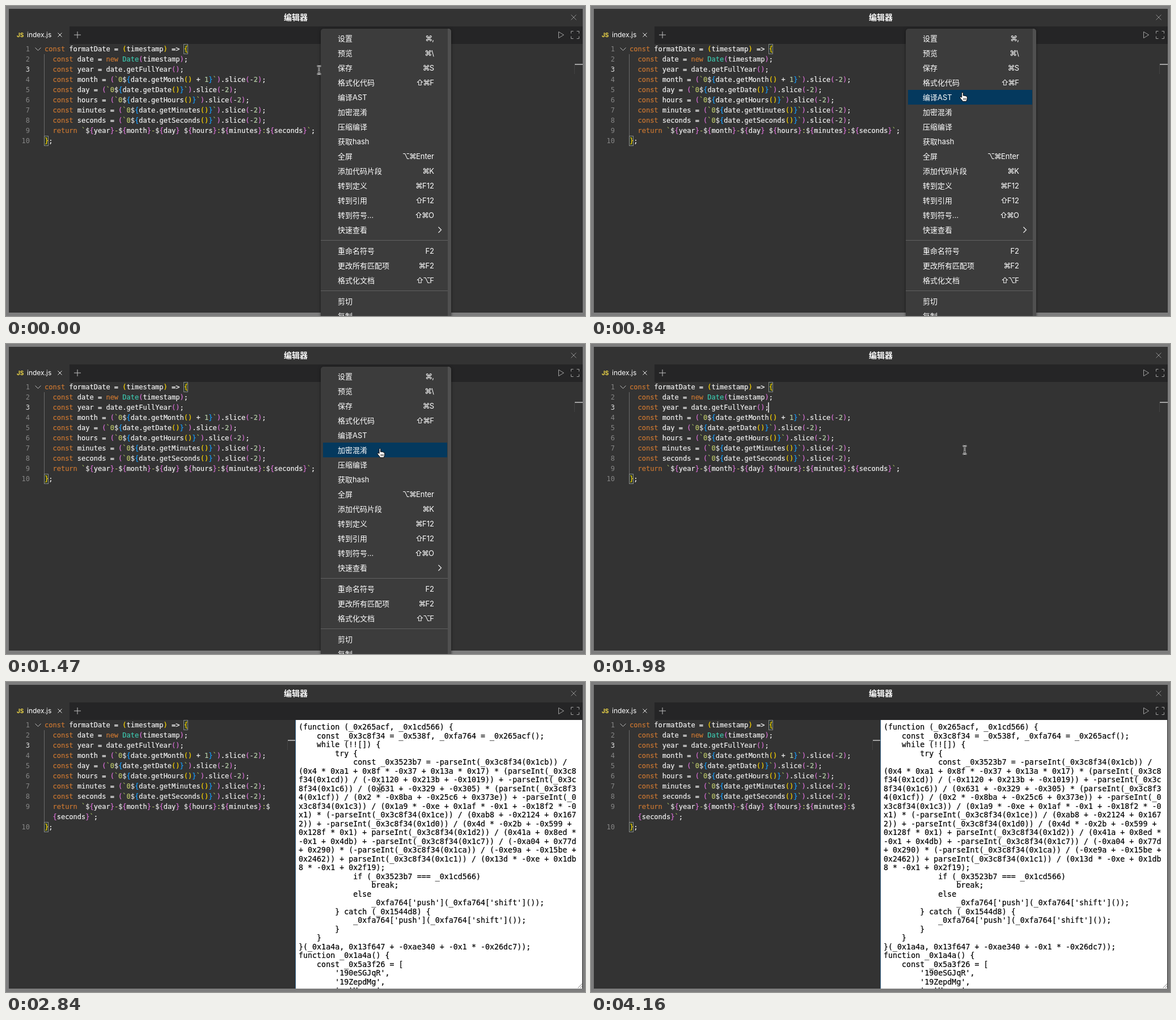
An HTML page for the animation above (4.21 s loop, 1021 by 547 pixels).

```html
<!DOCTYPE html>
<html lang="zh-CN">
<head>
<meta charset="utf-8">
<title>编辑器</title>
<style>
html, body { margin: 0; width: 100%; height: 100%; overflow: hidden; background: #7d7d7d; }
body { position: relative; font: 13px Inter, "Noto Sans CJK SC", "Noto Sans CJK", "DejaVu Sans", sans-serif; color: #fff; }
div, svg { position: absolute; }
.hidden { display: none; }
#win { left: 5px; top: 5px; width: 1012px; height: 536px; background: #333; }
#title { left: 5px; top: 5px; width: 1012px; line-height: 30px; text-align: center; font-size: 14px; font-weight: 600; }
#tabs { left: 112px; top: 36px; width: 905px; height: 31px; background: #252526; }
#badge { left: 19px; top: 43px; line-height: 17px; font-size: 10px; font-weight: 700; color: #f0d848; }
#file { left: 37px; top: 42px; line-height: 18px; font-size: 12px; }
.code, .num { font: 12px/18px "DejaVu Sans Mono", monospace; white-space: pre; }
.code { left: 68px; color: #f4f4f4; -webkit-text-stroke: .2px; }
.num { left: 12px; width: 30px; text-align: right; color: #858585; }
.num.on { color: #e0e0e0; }
.match { box-sizing: border-box; width: 8px; height: 18px; border: 1px solid #8a8a8a; background: rgba(0, 100, 0, .12); }
#guide { left: 67px; top: 85px; width: 1px; background: #6a6a6a; }
#mark { top: 102px; width: 14px; height: 2px; background: #a3a3a3; }
#rule { top: 104px; width: 1px; height: 16px; background: #434343; }
#caret { left: 312px; top: 103px; width: 2px; height: 18px; background: #c4c4c4; }
#panel { left: 510px; top: 67px; width: 505px; height: 474px; border-left: 1px solid #2b5a80; background: #fff; overflow: hidden; }
#out { left: 5px; top: 5px; font: 13.333px/15.5px "DejaVu Sans Mono", monospace; white-space: pre; color: #000; -webkit-text-stroke: .2px; }
#menu { left: 555px; top: 40px; width: 230px; height: 520px; background: #3c3c3c; border-radius: 5px; box-shadow: 0 1px 5px rgba(0, 0, 0, .5); overflow: hidden; }
#thumb { right: 0; top: 0; width: 6px; height: 100%; background: #505050; }
.item { left: 4px; width: 219px; height: 26px; line-height: 26px; }
.item.on { background: #04395e; }
.item b { position: absolute; left: 26px; font-weight: 400; white-space: nowrap; }
.item kbd { position: absolute; right: 23px; font: inherit; white-space: nowrap; }
.item kbd i { display: inline-block; width: 12px; text-align: center; font-style: normal; }
.sep { left: 0; width: 224px; height: 1px; background: #606060; }
svg { left: 0; top: 0; overflow: visible; fill: none; }
</style>
</head>
<body>
<div id="win"></div>
<div id="title">编辑器</div>
<div id="tabs"></div>
<div id="badge">JS</div>
<div id="file">index.js</div>
<svg width="1021" height="547" stroke="#c0c0c0">
  <path d="M91.5 47.5l7 7m0-7l-7 7" stroke="#eee"/>
  <path d="M120 51h12m-6-6v12"/>
  <path d="M996.5 15.5l9 9m0-9l-9 9" stroke="#909090"/>
  <path d="M974.5 45.5v11l9-5.5z" stroke="#a0a0a0"/>
  <path d="M996.5 48.5v-4h4m6 0h4v4m0 5v4h-4m-6 0h-4v-4" stroke="#a0a0a0"/>
  <path d="M51.5 73.5l5 5 5-5"/>
</svg>
<div id="guide"></div>
<div id="editor"></div>
<div id="rule"></div>
<div id="mark"></div>
<div id="caret"></div>
<div id="panel">
  <div id="out"></div>
  <svg width="505" height="474" stroke="#777"><path d="M497.5 473l8-8m-4 8l4-4"/></svg>
</div>
<div id="menu"><div id="thumb"></div></div>
<svg width="1021" height="547">
  <g id="hand">
    <path d="M-1.6 9V1.3Q-1.6 0-.3 0Q1 0 1 1.3V6Q2.5 5 3.6 6.3Q5 5.5 6 7Q8 6.4 8 8.4V11Q8 13.5 6.4 16H0Q-1 13.5-4 10.6Q-5.4 8.6-4 8Q-3 7.6-1.6 9Z" fill="#fff" stroke="#000"/>
    <path d="M1.6 10v3.5m2-3.5v3.5m2-3.5v3.5" stroke="#000" stroke-width=".8"/>
  </g>
  <g id="beam"></g>
</svg>
<script>
const $ = id => document.getElementById(id);
const LOOP = 4210, STEP = 30, ROW = 18, TOP = 67;

function add(parent, cls, style, html = '') {
  const el = document.createElement('div');
  el.className = cls;
  Object.assign(el.style, style);
  el.innerHTML = html;
  parent.append(el);
  return el;
}

// ---- code editor ----
const clock = (name, getter, extra = '') =>
  '  const ' + name + ' = (`0${date.' + getter + '()' + extra + '}`).slice(-2);';
const head = [
  'const formatDate = (timestamp) => {',
  '  const date = new Date(timestamp);',
  '  const year = date.getFullYear();',
  clock('month', 'getMonth', ' + 1'),
  clock('day', 'getDate'),
  clock('hours', 'getHours'),
  clock('minutes', 'getMinutes'),
  clock('seconds', 'getSeconds')
];
const ret = '  return `${year}-${month}-${day} ${hours}:${minutes}:$';
const wide = [...head, ret + '{seconds}`;', '};'];
const wrapped = [...head, ret, '  {seconds}`;', '};'];

function painter() {
  const pairs = ['#ffd700', '#da70d6', '#179fff'];
  const words = { const: '#cc7832', new: '#cc7832', return: '#cc7832', Date: '#3dc9b0' };
  let depth = 0, quoted = false, hole = false;
  const colour = tok => {
    if ('({'.includes(tok)) {
      if (quoted && tok === '{') hole = true;
      return pairs[depth++ % 3];
    }
    if (')}'.includes(tok)) {
      if (tok === '}') hole = false;
      return pairs[--depth % 3];
    }
    if (tok === '`') { quoted = !quoted; return '#a5c261'; }
    if (tok === '$') return '#e0e0e0';
    if (quoted && !hole) return '#b9c46a';
    if (/^\d/.test(tok)) return '#b5cea8';
    return words[tok] || '#f4f4f4';
  };
  return line => line.replace(/\w+|\s+|./g, tok =>
    `<span style="color:${colour(tok)}">${tok === '>' ? '&gt;' : tok}</span>`);
}

function buildCode(lines) {
  const box = add($('editor'), '', {});
  const paint = painter();
  const last = lines.length - 1;
  const px = row => TOP + row * ROW + 'px';
  add(box, 'match', { left: '313px', top: px(0) });
  add(box, 'match', { left: '67px', top: px(last) });
  let n = 0;
  lines.forEach((line, row) => {
    add(box, 'code', { top: px(row) }, paint(line));
    if (!line.startsWith('  {')) {
      n++;
      add(box, n === 3 ? 'num on' : 'num', { top: px(row) }, n);
    }
  });
  return box;
}
const wideBox = buildCode(wide), wrapBox = buildCode(wrapped);

$('out').textContent = `(function (_0x265acf, _0x1cd566) {
    const _0x3c8f34 = _0x538f, _0xfa764 = _0x265acf();
    while (!![]) {
        try {
            const _0x3523b7 = -parseInt(_0x3c8f34(0x1cb)) /
(0x4 * 0xa1 + 0x8f * -0x37 + 0x13a * 0x17) * (parseInt(_0x3c8
f34(0x1cd)) / (-0x1120 + 0x213b + -0x1019)) + -parseInt(_0x3c
8f34(0x1c6)) / (0x631 + -0x329 + -0x305) * (parseInt(_0x3c8f3
4(0x1cf)) / (0x2 * -0x8ba + -0x25c6 + 0x373e)) + -parseInt(_0
x3c8f34(0x1c3)) / (0x1a9 * -0xe + 0x1af * -0x1 + -0x18f2 * -0
x1) * (-parseInt(_0x3c8f34(0x1ce)) / (0xab8 + -0x2124 + 0x167
2)) + -parseInt(_0x3c8f34(0x1d0)) / (0x4d * -0x2b + -0x599 +
0x128f * 0x1) + parseInt(_0x3c8f34(0x1d2)) / (0x41a + 0x8ed *
-0x1 + 0x4db) + -parseInt(_0x3c8f34(0x1c7)) / (-0xa04 + 0x77d
+ 0x290) * (-parseInt(_0x3c8f34(0x1ca)) / (-0xe9a + -0x15be +
0x2462)) + parseInt(_0x3c8f34(0x1c1)) / (0x13d * -0xe + 0x1db
8 * -0x1 + 0x2f19);
            if (_0x3523b7 === _0x1cd566)
                break;
            else
                _0xfa764['push'](_0xfa764['shift']());
        } catch (_0x1544d8) {
            _0xfa764['push'](_0xfa764['shift']());
        }
    }
}(_0x1a4a, 0x13f647 + -0xae340 + -0x1 * -0x26dc7));
function _0x1a4a() {
    const _0x5a3f26 = [
        '190eSGJqR',
        '19ZepdMg',
        'getHours',`;

// ---- context menu ----
const entries = [
  '设置|⌘,', '预览|⌘\\', '保存|⌘S', '格式化代码|⇧⌘F', '编译AST|', '加密混淆|', '压缩编译|',
  '获取hash|', '全屏|⌥⌘Enter', '添加代码片段|⌘K', '转到定义|⌘F12', '转到引用|⇧F12',
  '转到符号...|⇧⌘O', '快速查看|', '', '重命名符号|F2', '更改所有匹配项|⌘F2', '格式化文档|⇧⌥F',
  '', '剪切|', '复制|'
];
let y = 4;
const items = [];
for (const entry of entries) {
  if (!entry) {
    add($('menu'), 'sep', { top: y + 5 + 'px' });
    y += 11;
    continue;
  }
  const [label, keys] = entry.split('|');
  const kbd = keys.replace(/[⌘⇧⌥]/g, '<i>$&</i>');
  items.push(add($('menu'), 'item', { top: y + 'px' }, `<b>${label}</b><kbd>${kbd}</kbd>`));
  y += 26;
}
items[13].insertAdjacentHTML('beforeend',
  '<svg width="219" height="26" stroke="#eee" stroke-width="1.2"><path d="M203.5 8l5 5-5 5"/></svg>');

// ---- text pointer: dark core with a light rim ----
const bar = 'M-3.5-7H-1.5L0-5.5L1.5-7H3.5M0-5.5V5.5M-3.5 7H-1.5L0 5.5L1.5 7H3.5M-2 3H2';
$('beam').innerHTML = [['#fff', 2.6], ['#000', 1]].map(([ink, w]) =>
  `<path d="${bar}" stroke="${ink}" stroke-width="${w}"/>`).join('');

// ---- timeline ----
const path = [ // time, x, y
  [360, 552, 113], [450, 577, 117], [570, 642, 126], [720, 654, 145], [900, 656, 156],
  [1100, 658, 162], [1250, 659, 171], [1440, 660, 183], [1530, 659, 187],
  [3260, 659, 187], [3320, 735, 285], [3380, 870, 465], [3440, 916, 528],
  [3590, 916, 528], [3620, 927, 535], [3680, 945, 548], [3740, 950, 560]
];
const hover = [[0, -1], [450, 2], [600, 3], [780, 4], [1350, 5]]; // time, row
const blink = [[1949, 0], [1950, 1], [2720, 1], [2840, 0], [3260, 0], [3380, 1], [3710, 1], [3830, 0]];

function at(keys, t, col = 1) {
  if (t <= keys[0][0]) return keys[0][col];
  const i = keys.findIndex(k => k[0] > t);
  if (i < 0) return keys[keys.length - 1][col];
  const a = keys[i - 1], b = keys[i];
  return a[col] + (b[col] - a[col]) * (t - a[0]) / (b[0] - a[0]);
}
const show = (el, on) => el.classList.toggle('hidden', !on);

function draw(ms) {
  const now = ms % LOOP;
  const menu = now < 1950, split = now >= 2100;
  // the 30 ms beat shifts by 10 ms once the panel is open
  const shift = split ? 10 : 0;
  const t = Math.floor((now + shift) / STEP) * STEP - shift;
  const x = at(path, t), cy = at(path, t, 2);
  const pointing = menu && x > 558;
  const row = hover.filter(h => h[0] <= t).pop()[1];

  show($('menu'), menu);
  items.forEach((el, i) => el.classList.toggle('on', i === row));
  show($('panel'), split);
  show(wideBox, !split);
  show(wrapBox, split);
  $('guide').style.height = (split ? 9 : 8) * ROW + 'px';
  $('mark').style.left = (split ? 497 : 1003) + 'px';
  $('rule').style.left = (split ? 496 : 1002) + 'px';
  $('caret').style.opacity = at(blink, t);

  show($('hand'), pointing);
  show($('beam'), !pointing && cy < 558);
  for (const id of ['hand', 'beam']) $(id).setAttribute('transform', `translate(${x} ${cy})`);
}

const start = performance.now();
function tick() {
  draw(performance.now() - start);
  requestAnimationFrame(tick);
}
tick();
</script>
</body>
</html>
```
